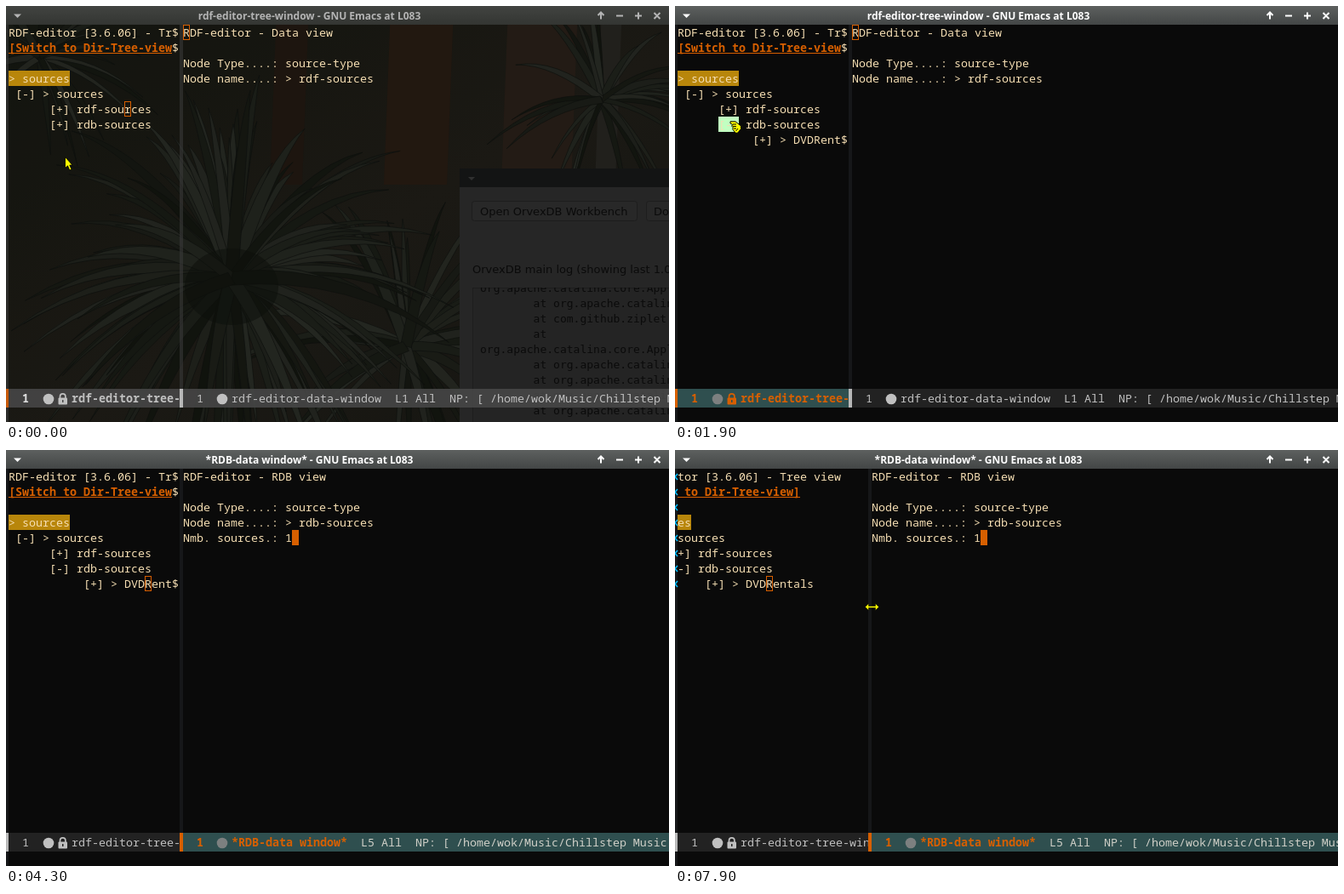
An HTML page for the animation above (8000 ms loop, 779 by 489 pixels).

```html
<!DOCTYPE html>
<html lang="en">
<head>
<meta charset="utf-8">
<title>RDF editor</title>
<style>
  html, body { margin: 0; width: 100%; height: 100%; overflow: hidden; background: #0a0a0a; }
  svg { display: block; }
  text { white-space: pre; font: 13.3333px "Noto Sans Mono", monospace; }
  .bold { font-weight: bold; }
  .title { font: bold 12px "Noto Sans", sans-serif; text-anchor: middle; }
  .gui { font: 13px "DejaVu Sans", sans-serif; }
  .log { font: 13px "DejaVu Sans Mono", monospace; }
</style>
</head>
<body>
<svg width="779" height="489" viewBox="0 0 779 489">
  <defs>
    <linearGradient id="barOn" x2="0" y2="1"><stop stop-color="#5d605f"/><stop offset="1" stop-color="#434646"/></linearGradient>
    <linearGradient id="barOff" x2="0" y2="1"><stop stop-color="#424441"/><stop offset="1" stop-color="#333532"/></linearGradient>
    <linearGradient id="flash"><stop stop-color="#858585"/><stop offset="1" stop-color="#484848"/></linearGradient>
    <linearGradient id="wood" y2="1"><stop stop-color="#151811"/><stop offset=".55" stop-color="#211e18"/><stop offset="1" stop-color="#191a15"/></linearGradient>
    <clipPath id="logClip"><rect x="549" y="331" width="230" height="158"/></clipPath>
    <clipPath id="leftClip"><rect id="leftRect" y="22" width="204" height="467"/></clipPath>
  </defs>
  <g id="backdrop"></g>
  <g id="ui"></g>
</svg>
<script>
const LOOP = 8000;
const CELL = 8, LINE = 18, TOP = 22;
const INK = '#f5deb3', ORANGE = '#d75f00', BG = '#0a0a0a', GREEN = '#c1ffc1';
const $ = id => document.getElementById(id);

const rect = (x, y, w, h, fill, more = '') =>
  `<rect x="${x}" y="${y}" width="${w}" height="${h}" fill="${fill}" ${more}/>`;
const text = (x, y, str, fill = INK, cls = '', more = '') =>
  `<text x="${x}" y="${y}" fill="${fill}" class="${cls}" ${more}>${str.replace(/</g, '&lt;').replace(/>/g, '&gt;')}</text>`;
const path = (d, fill, more = '') => `<path d="${d}" fill="${fill}" ${more}/>`;
const rowY = row => TOP + row * LINE;
const rowText = (x, row, str, fill, cls) => text(x, rowY(row) + 14, str, fill, cls);

function seeded(seed) {
  return () => (seed = (seed * 16807) % 2147483647) / 2147483647;
}

// Rosette of long, drooping, tapered leaves.
function rosette(cx, cy, count, reach, width, seed) {
  const rnd = seeded(seed);
  let out = '';
  for (let i = 0; i < count; i++) {
    const angle = rnd() * Math.PI * 2;
    const len = reach * (0.55 + 0.45 * rnd());
    const c = Math.cos(angle), s = Math.sin(angle);
    const mx = cx + c * len * 0.55, my = cy + s * len * 0.55 - len * 0.15;
    const ex = cx + c * len, ey = cy + s * len + len * 0.1;
    const w = width * (0.6 + rnd() * 0.6);
    const pt = (x, y, k) => `${(x - s * w * k).toFixed(1)} ${(y + c * w * k).toFixed(1)}`;
    const shade = 20 + Math.floor(rnd() * 24);
    out += path(`M${pt(cx, cy, 1)}Q${pt(mx, my, 1)} ${ex.toFixed(1)} ${ey.toFixed(1)}Q${pt(mx, my, -1)} ${pt(cx, cy, -1)}Z`,
      `rgb(${shade},${shade + 3},${shade - 4})`, 'stroke="#111410" stroke-width=".7"');
  }
  return out;
}

function photo() {
  const trunk = (x, w, fill) => path(`M${x} 0h${w}l-8 210h${-w}Z`, fill);
  return rect(0, 0, 779, 489, 'url(#wood)')
    + trunk(318, 38, '#231a12') + trunk(452, 74, '#2a1d13') + trunk(590, 82, '#2b2119') + trunk(700, 24, '#282722')
    + rosette(700, 110, 36, 150, 4, 77)
    + rosette(40, 60, 30, 150, 4, 31)
    + rosette(470, 400, 40, 230, 6, 19)
    + rosette(265, 320, 120, 275, 7, 5)
    + `<ellipse cx="265" cy="330" rx="55" ry="45" fill="#10130e" opacity=".55"/>`
    + rect(0, 0, 779, 489, '#000', 'opacity=".18"');
}

function logWindow() {
  const ink = '#0b0b0b', frame = 'stroke="#1d1d1d"';
  const apache = 'org.apache.catalina.core.Appl', at = '        at ';
  const lines = [apache, at + apache, at + 'com.github.ziplet.filter', at, apache,
    at + apache, at + apache, at + apache, at + apache];
  return rect(533, 191, 246, 22, '#131414') + rect(533, 213, 246, 276, '#262626')
    + path('M543 201h8l-4 4Z', '#303030')
    + rect(547.5, 229.5, 194, 23, '#282828', frame + ' rx="3"') + text(557, 246, 'Open OrvexDB Workbench', ink, 'gui')
    + rect(752.5, 229.5, 60, 23, '#282828', frame + ' rx="3"') + text(761, 246, 'Download', ink, 'gui')
    + text(548, 314, 'OrvexDB main log (showing last 1.0', ink, 'gui')
    + rect(548.5, 331.5, 260, 170, '#242424', frame)
    + `<g clip-path="url(#logClip)">${lines.map((s, i) => text(557, 336 + i * LINE, s, ink, 'log')).join('')}</g>`;
}

// time, shape, x, y
const pointerSteps = [
  [0, 'arrow', 69, 177], [300, 'arrow', 72, 173], [400, 'arrow', 76, 168], [500, 'arrow', 76, 161],
  [600, 'arrow', 73, 154], [700, 'hand', 70, 145], [800, 'hand', 67, 139], [900, 'hand', 64, 135],
  [2400, 'arrow', 100, 149], [2500, 'hand', 134, 158], [2600, 'arrow', 150, 172],
  [3500, 'hand', 166, 158], [4300, 'none', 0, 0],
  [4800, 'arrow', 166, 172], [4900, 'arrow', 178, 177], [5000, 'arrow', 187, 181], [5100, 'arrow', 195, 183],
  [5300, 'arrow', 204, 184], [5400, 'arrow', 216, 184], [5500, 'arrow', 222, 184],
  [6600, 'arrow', 220, 184], [6700, 'arrow', 217, 184], [6800, 'arrow', 214, 184], [6900, 'arrow', 211, 184],
  [7000, 'resize', 206, 184], [7100, 'resize', 204, 184], [7200, 'resize', 202, 184], [7300, 'resize', 200, 184],
  [7900, 'resize', 231, 184]
];
const shapes = {
  none: '',
  arrow: path('M.5 .5V13.5L3.5 10.8L5.8 16L8 15L5.8 10H9Z', '#ff0', 'stroke="#000" stroke-width=".8"'),
  hand: path('M1 .8H7L13.5 6V9.5L9.5 14.2H7L3.5 9.5L4.5 8L2.5 6.2L3.8 4.5L1 3Z', '#ff0', 'stroke="#000"')
    + path('M4 4H8M4 6.5H8M5 9H8M10 9L7.5 12', 'none', 'stroke="#000"'),
  resize: path('M-7.5 .5L-3.5 -3.5V-.5H4.5V-3.5L8.5 .5L4.5 4.5V1.5H-3.5V4.5Z', '#ff0', 'stroke="#000" stroke-width=".5"')
};

const between = (t, a, b) => t >= a && t < b;

function stateAt(t) {
  const [, shape, px, py] = pointerSteps.filter(step => step[0] <= t).pop();
  const rdb = t >= 4300, wide = t >= 7900;
  return {
    shape, px, py, rdb, wide,
    focused: t >= 1300,
    pressed: between(t, 1300, 1400),
    open: t >= 1400,
    split: wide ? 227 : 204,
    scroll: wide ? 7 : 0,
    hover: shape !== 'hand' ? null : py < 148 ? { row: 6, col: 6, len: 3 } : { row: 7, col: 15, len: 10 },
    treeCursor: t < 1300 ? [5, 17, 'hollow']
      : rdb ? [7, 20, 'hollow']
      : t >= 4100 ? [7, 20, 'solid']
      : between(t, 1900, 2400) || t >= 3900 ? null : [6, 7, 'solid'],
    dataCursorOn: rdb && (wide || Math.floor((t - 4300) / 500) % 2 === 0)
  };
}

function cursor(x, row, kind, char = '', ink = BG) {
  const y = rowY(row);
  return kind === 'hollow'
    ? rect(x + .5, y + .5, CELL - 1, LINE - 1, 'none', `stroke="${ORANGE}"`)
    : rect(x, y, CELL, LINE, ORANGE) + rowText(x, row, char, ink);
}

function titleBar(s) {
  const ink = s.focused ? '#fff' : '#b4b4b4';
  const name = s.rdb ? '*RDB-data window*' : 'rdf-editor-tree-window';
  return rect(0, 0, 779, TOP, s.focused ? 'url(#barOn)' : 'url(#barOff)')
    + path('M9 9.5h9l-4.500 4.500Z', ink)
    + text(356.5, 16, name + ' - GNU Emacs at L083', ink, 'title')
    + path('M699 15.500V8M695.500 11L699 7.500L702.500 11M717 11.500h8M739 11.500h8M743 7.500v8M761.500 8l7 7M768.500 8l-7 7',
      'none', `stroke="${ink}" stroke-width="2"`);
}

function treePane(s) {
  const x0 = 3 - s.scroll * CELL;
  const x = col => x0 + col * CELL;
  const rows = ['RDF-editor [3.6.06] - Tree view', '', '', '> sources', ' [-] > sources',
    '      [+] rdf-sources', `      [${s.open ? '-' : '+'}] rdb-sources`];
  if (s.open) rows.push('           [+] > DVDRentals');
  const link = '[Switch to Dir-Tree-view]';
  if (!s.wide) {
    rows.forEach((str, i) => { if (str.length > 25) rows[i] = str.slice(0, 24) + '$'; });
    rows[1] = ' '.repeat(24) + '$';
  }
  const label = s.wide ? link : link.slice(0, 24);
  let out = rect(x0, rowY(3), 72, LINE, '#b8860b');
  if (s.pressed) out += rect(75, rowY(6), 120, LINE, 'url(#flash)');
  if (s.hover) out += rect(x(s.hover.col), rowY(s.hover.row), s.hover.len * CELL, LINE, GREEN);
  out += rows.map((str, i) => rowText(x0, i, str)).join('')
    + rowText(x0, 1, label, ORANGE, 'bold') + rect(x0, rowY(1) + 15, label.length * CELL, 1, ORANGE);
  if (s.treeCursor) {
    const [row, col, kind] = s.treeCursor;
    out += cursor(x(col), row, kind, rows[row][col], s.pressed ? INK : BG);
  }
  return out;
}

function dataPane(s) {
  const x = s.split + 4;
  let out = rowText(x, 0, `RDF-editor - ${s.rdb ? 'RDB' : 'Data'} view`)
    + rowText(x, 2, 'Node Type....: source-type')
    + rowText(x, 3, `Node name....: > ${s.rdb ? 'rdb' : 'rdf'}-sources`);
  if (s.rdb) out += rowText(x, 4, 'Nmb. sources.: 1');
  else out += cursor(x, 0, 'hollow');
  if (s.dataCursorOn) out += cursor(x + 128, 4, 'solid');
  return out;
}

function modeLine(x, end, s, active, bold, name, tail, locked) {
  const lit = active && s.focused;
  const ink = lit ? ORANGE : '#c0c0c0';
  const cls = bold ? 'bold' : '';
  const nameX = x + (locked ? 77 : 61);
  const bar = active ? (s.focused ? ORANGE : '#c85a0a') : '#b8b8b8';
  const fill = !s.focused ? '#464646' : lit ? '#2f4f4f' : '#222';
  let out = rect(x, 450, end - x, 22, fill, s.focused ? '' : 'opacity=".9"')
    + rect(x, 450, locked ? 3 : 4, 22, bar)
    + text(x + (locked ? 19 : 20), 466, '1', !s.focused && active ? '#ddd' : ink, cls)
    + `<circle cx="${x + 50}" cy="462" r="6.300" fill="${lit ? '#7d8080' : '#c0c0c0'}"/>`
    + text(nameX, 466, name, ink, cls)
    + text(nameX + (name.length + 2) * CELL, 466, tail, lit ? '#d0d0c8' : '#c0c0c0');
  if (locked) {
    out += rect(61.5, 460.5, 10.5, 8, ink, 'rx="1"')
      + path('M63.500 461v-2a3.200 3.200 0 0 1 6.400 0v2', 'none', `stroke="${ink}" stroke-width="1.700"`)
      + rect(66, 463, 1.5, 3, fill);
  }
  return out;
}

function render(s) {
  $('backdrop').style.display = s.focused ? 'none' : '';
  $('leftRect').setAttribute('width', s.split);
  const edge = s.focused ? '#161719' : '#3a3a3a', edgeMore = s.focused ? '' : 'opacity=".6"';
  const tail = `L${s.rdb ? 5 : 1} All  NP: [ /home/wok/Music/Chillstep Music`;
  let out = s.focused ? rect(0, 0, 779, 489, BG) : '';
  out += rect(0, TOP, 3, 467, edge, edgeMore) + rect(s.split, TOP, 4, 428, edge, edgeMore)
    + titleBar(s)
    + `<g clip-path="url(#leftClip)">${treePane(s)}</g>`
    + dataPane(s);
  if (s.wide) {
    out += rect(0, TOP, 3, 428, edge);
    for (let row = 0; row < 8; row++)
      out += path(`M3 ${rowY(row) + 6}l-3 3.500l3 3.500`, 'none', 'stroke="#00bfff" stroke-width="1.500"');
  }
  out += `<g clip-path="url(#leftClip)">${modeLine(0, s.split, s, !s.rdb, !s.rdb, 'rdf-editor-tree-window', '', true)}</g>`
    + modeLine(s.split, 779, s, s.rdb, false, s.rdb ? '' : 'rdf-editor-data-window', s.rdb ? '' : tail, false);
  if (s.rdb) {
    const nameX = s.split + 61;
    out += text(s.split + 20, 466, '1', ORANGE, 'bold')
      + text(nameX, 466, '*RDB-data window*', ORANGE, 'bold')
      + text(nameX + 19 * CELL, 466, tail, '#d0d0c8');
  }
  out += `<g transform="translate(${s.px} ${s.py})">${shapes[s.shape]}</g>`;
  $('ui').innerHTML = out;
}

$('backdrop').innerHTML = photo() + logWindow();
const start = performance.now();
let shown = '';
function tick() {
  const state = stateAt((performance.now() - start) % LOOP);
  const key = JSON.stringify(state);
  if (key !== shown) { render(state); shown = key; }
  requestAnimationFrame(tick);
}
tick();
</script>
</body>
</html>
```
